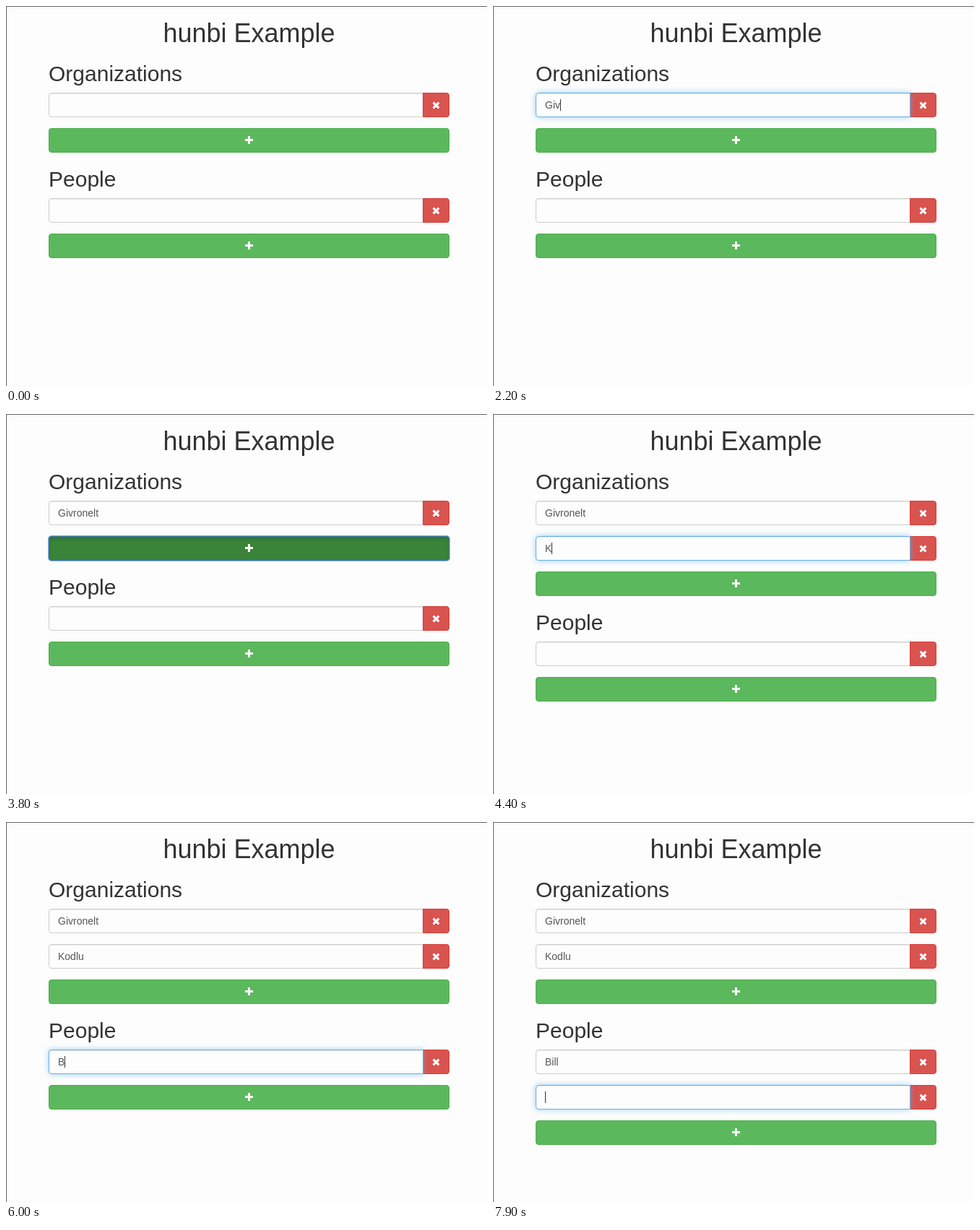
Recreate the animation shown at these times as an HTML page. Size 666x526 px, loop 8000 ms.

```html
<!DOCTYPE html>
<html lang="en">
<head>
<meta charset="utf-8">
<title>Form rows</title>
<style>
  * { box-sizing: border-box; }
  html, body { margin: 0; width: 100%; height: 100%; overflow: hidden; }
  body {
    position: relative;
    background: #fdfdfd;
    color: #333;
    font: 14px/20px "Liberation Sans", Arial, sans-serif;
  }
  body::after {
    content: "";
    position: absolute;
    inset: 0;
    border: solid #666;
    border-width: 1px 0 0 1px;
  }
  main { position: absolute; left: 59px; top: 18px; width: 555px; }
  h1, h2 { font-weight: 400; }
  h1 { margin: 0; font-size: 36px; line-height: 40px; text-align: center; }
  h2 { margin: 20px 0 10px; font-size: 30px; line-height: 33px; }
  h1 + h2 { margin-top: 19px; }
  .row { position: relative; height: 34px; margin-bottom: 15px; }
  .input {
    position: absolute;
    width: 519px;
    height: 34px;
    padding: 6px 12px;
    border: 1px solid;
    border-radius: 4px 0 0 4px;
    background: #fdfdfd;
    color: #555;
    white-space: pre;
  }
  .input.current { z-index: 1; }
  .caret { position: absolute; top: 8px; width: 1px; height: 16px; background: #333; }
  .delete, .add { position: absolute; height: 34px; border: 1px solid; }
  .delete {
    left: 518px;
    width: 37px;
    border-color: #d43f3a;
    border-radius: 0 4px 4px 0;
    background: #d9534f;
  }
  .delete.focus { z-index: 2; background: #c9302c; border-color: #ac2925; }
  .add {
    position: relative;
    width: 555px;
    border-color: #4cae4c;
    border-radius: 4px;
    background: #5cb85c;
  }
  .add.hover, .add.focus { background: #449d44; border-color: #398439; }
  .add.active {
    background: #398439;
    border-color: #255625;
    box-shadow: inset 0 3px 5px #0002;
  }
  .focus { outline: 2px solid #4d88d8b0; outline-offset: -1px; }
  .icon { position: absolute; width: 11px; height: 11px; fill: none; stroke: #fff; stroke-width: 3; }
  .add .icon { left: 270.5px; top: 10px; }
  .delete .icon { left: 11.5px; top: 11px; }
  .cursor { position: absolute; overflow: visible; width: 1px; height: 1px; fill: #fff; stroke: #111; stroke-linejoin: round; }
</style>
</head>
<body>
<script>
const LOOP = 8000, STEP = 100;
const FIRST_NEW_ROW = 3900, SECOND_NEW_ROW = 7700;

// Keyboard focus over time: [start, control]
const focusChanges = [
  [0, ""], [1400, "org0"], [3100, "org0-delete"], [3300, "org-add"],
  [3900, "org1"], [5100, "org1-delete"], [5200, "org-add"], [5400, "person0"],
  [6600, "person0-delete"], [6800, "person-add"], [7700, "person1"]
];
const keyTimes = {
  org0: ["Givronelt", [2000, 2200, 2200, 2400, 2500, 2600, 2700, 2800, 3000]],
  org1: ["Kodlu", [4400, 4500, 4700, 4800, 4900]],
  person0: ["Bill", [6000, 6100, 6300, 6500]],
  person1: ["", []]
};
const icons = {
  plus: "M5.5 0V11M0 5.5H11",
  cross: "M1.6 1.6L9.4 9.4M9.4 1.6L1.6 9.4"
};
const cursors = {
  arrow: "M0 0V16L3.8 12.5L6.3 18.5L9 17.4L6.5 11.6H11.5Z",
  hand: "M0 1.5C0-.5 3.5-.5 3.5 1.5V7.5Q6 6 7 8Q9.5 7 10.3 9.2Q13 8.5 13 11.5V17"
    + "Q12.5 20 11 21.5V24H2.5V22Q-1.5 18-4 14.5C-5 12-2.5 11.5 0 14.5Z"
};

const clamp = x => Math.max(0, Math.min(1, x));
const between = (x, low, high) => x >= low && x < high;
const icon = name => `<svg class="icon" viewBox="0 0 11 11"><path d="${icons[name]}"/></svg>`;

function focusAt(t) {
  const index = focusChanges.findLastIndex(([start]) => start <= t);
  const [start, current] = focusChanges[index];
  const previous = index ? focusChanges[index - 1][1] : "";
  const progress = clamp((t - start + 50) / 150);
  const glow = id => id === current ? progress : id === previous ? 1 - progress : 0;
  return { current, glow };
}

function pointerAt(t) {
  if (!between(t, 100, 1000)) return null;
  const rise = clamp((t - 100) / 500), drift = clamp((t - 600) / 300);
  const y = 442 - 269 * rise * rise * (3 - 2 * rise) - 16 * drift * drift;
  const over = between(y, 169, 203) ? "org-add" : between(y, 315, 349) ? "person-add" : "";
  const hidden = between(y, 120, 154) || between(y, 266, 300);
  return { y, over, hidden };
}

function row(id, t, focus, opacity = 1) {
  const [word, times] = keyTimes[id];
  const text = word.slice(0, times.filter(time => time <= t).length);
  const glow = focus.glow(id);
  const isCurrent = focus.current === id;
  const hasCaret = isCurrent && !between(t, 1800, 2000);
  const style = `border-color:color-mix(in srgb, #66afe9 ${glow * 100}%, #ccc);`
    + `box-shadow:inset 0 1px 1px #00000013, 0 0 8px rgba(102,175,233,${0.6 * glow})`;
  return `<div class="row" style="opacity:${opacity}">
    <div class="input ${isCurrent ? "current" : ""}" style="${style}">${text}${hasCaret ? '<i class="caret"></i>' : ""}</div>
    <div class="delete ${focus.current === id + "-delete" ? "focus" : ""}">${icon("cross")}</div>
  </div>`;
}

function addButton(id, focus, pointer, pressed) {
  const classes = ["add"];
  if (focus.current === id) classes.push("focus");
  if (pointer?.over === id) classes.push("hover");
  if (pressed) classes.push("active");
  return `<div class="${classes.join(" ")}">${icon("plus")}</div>`;
}

function cursor(pointer) {
  if (!pointer || pointer.hidden) return "";
  const shape = pointer.over ? "hand" : "arrow";
  return `<svg class="cursor" style="left:324px;top:${pointer.y}px"><path d="${cursors[shape]}"/></svg>`;
}

function scene(t) {
  const focus = focusAt(t), pointer = pointerAt(t);
  const newRow = (id, start) => t < start ? "" : row(id, t, focus, clamp((t - start + 50) / 250));
  return `<main>
    <h1>hunbi Example</h1>
    <h2>Organizations</h2>
    ${row("org0", t, focus)}${newRow("org1", FIRST_NEW_ROW)}
    ${addButton("org-add", focus, pointer, between(t, FIRST_NEW_ROW - 100, FIRST_NEW_ROW))}
    <h2>People</h2>
    ${row("person0", t, focus)}${newRow("person1", SECOND_NEW_ROW)}
    ${addButton("person-add", focus, pointer, between(t, SECOND_NEW_ROW - 100, SECOND_NEW_ROW))}
  </main>${cursor(pointer)}`;
}

let shown = -1;
function draw() {
  const t = Math.floor(performance.now() % LOOP / STEP) * STEP;
  if (t !== shown) document.body.innerHTML = scene(shown = t);
  requestAnimationFrame(draw);
}
draw();
</script>
</body>
</html>
```
